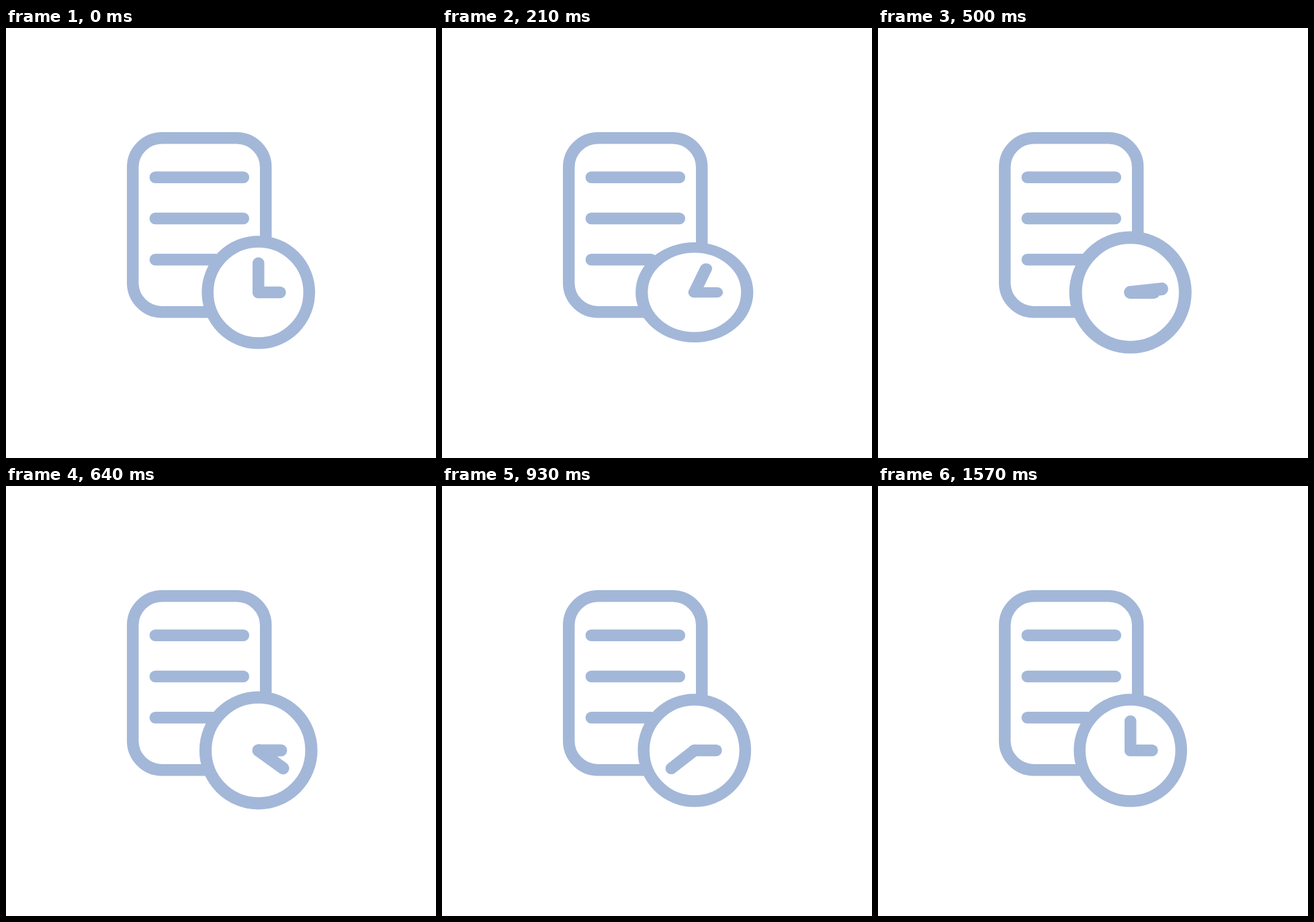
These frames come from a looping animation (640 px wide and 640 px high, 4.78 s). An HTML page:

```html
<!DOCTYPE html>
<html lang="en">
<head>
<meta charset="utf-8">
<title>Document with clock</title>
<style>
  html, body { margin: 0; width: 100%; height: 100%; overflow: hidden; background: #fff; }
  svg { display: block; width: 100vw; height: 100vh; }
  .ink { fill: none; stroke: #a3b7d8; stroke-width: 17.5; stroke-linecap: round; stroke-linejoin: round; }
</style>
</head>
<body>
<svg viewBox="0 0 640 640">
  <g class="ink">
    <rect x="188.7" y="163.8" width="198" height="259" rx="43.5"/>
    <path d="M222.3 222.2H353.3M222.3 283.5H353.3M222.3 344.7H311.5"/>
    <g id="clock">
      <circle r="75.6" fill="#fff"/>
      <path d="M0 0H32.2"/>
      <path id="hand" d="M0 0V-43.6"/>
    </g>
  </g>
</svg>
<script>
const LOOP = 4780, FPS = 14, LAST = 22;
const clock = document.getElementById('clock');
const hand = document.getElementById('hand');

// [step, degrees]
const TURN = [[0, 0], [3, 22.5], [5, 47.2], [9, 126], [13, 232.1], [16, 294.4], [17, 313.4], [22, 360]];
// [step, scale] for the settling half of the bounce
const SETTLE = [[6, 1.101], [8, 1.058], [9, 1.042], [12, 1], [22, 1]];

const lerp = (a, b, u) => a + (b - a) * u;

function ease(a, b, from, to, x) {
  const u = Math.min(1, Math.max(0, (x - from) / (to - from)));
  return lerp(a, b, u * u * (3 - 2 * u));
}

function segment(table, x) {
  let i = 0;
  while (i < table.length - 2 && x > table[i + 1][0]) i++;
  return i;
}

function linear(table, x) {
  const i = segment(table, x);
  const [x0, y0] = table[i], [x1, y1] = table[i + 1];
  return lerp(y0, y1, (x - x0) / (x1 - x0));
}

// Hermite curve through the points, with a fixed slope at both ends
function smooth(table, x, endSlope) {
  const slope = k => {
    const a = table[k - 1], b = table[k + 1];
    return a && b ? (b[1] - a[1]) / (b[0] - a[0]) : endSlope;
  };
  const i = segment(table, x);
  const [x0, y0] = table[i], [x1, y1] = table[i + 1];
  const h = x1 - x0, u = (x - x0) / h, v = 1 - u;
  return y0 * (1 + 2 * u) * v * v + y1 * u * u * (3 - 2 * u)
    + h * u * v * (slope(i) * v - slope(i + 1) * u);
}

function scaleAt(n) {
  if (n >= 6) {
    const s = linear(SETTLE, n);
    return [s, s];
  }
  const sx = ease(1, 1.1, 0.8, 6, n);
  const sy = n < 2.3 ? ease(1, 0.86, 0, 2.3, n) : ease(0.86, 1.102, 2.3, 6, n);
  return [sx, sy];
}

const startOf = n => Math.round(n * 100 / FPS) * 10;

function stepAt(t) {
  let n = 0;
  while (n < LAST && startOf(n + 1) <= t) n++;
  return n;
}

function draw(t) {
  const n = stepAt(t);
  const [sx, sy] = scaleAt(n);
  clock.setAttribute('transform', `translate(375.7 393.5) scale(${sx} ${sy})`);
  hand.setAttribute('transform', `rotate(${smooth(TURN, n, 4)})`);
}

const begin = performance.now();
function tick() {
  draw((performance.now() - begin) % LOOP);
  requestAnimationFrame(tick);
}
tick();
</script>
</body>
</html>
```
